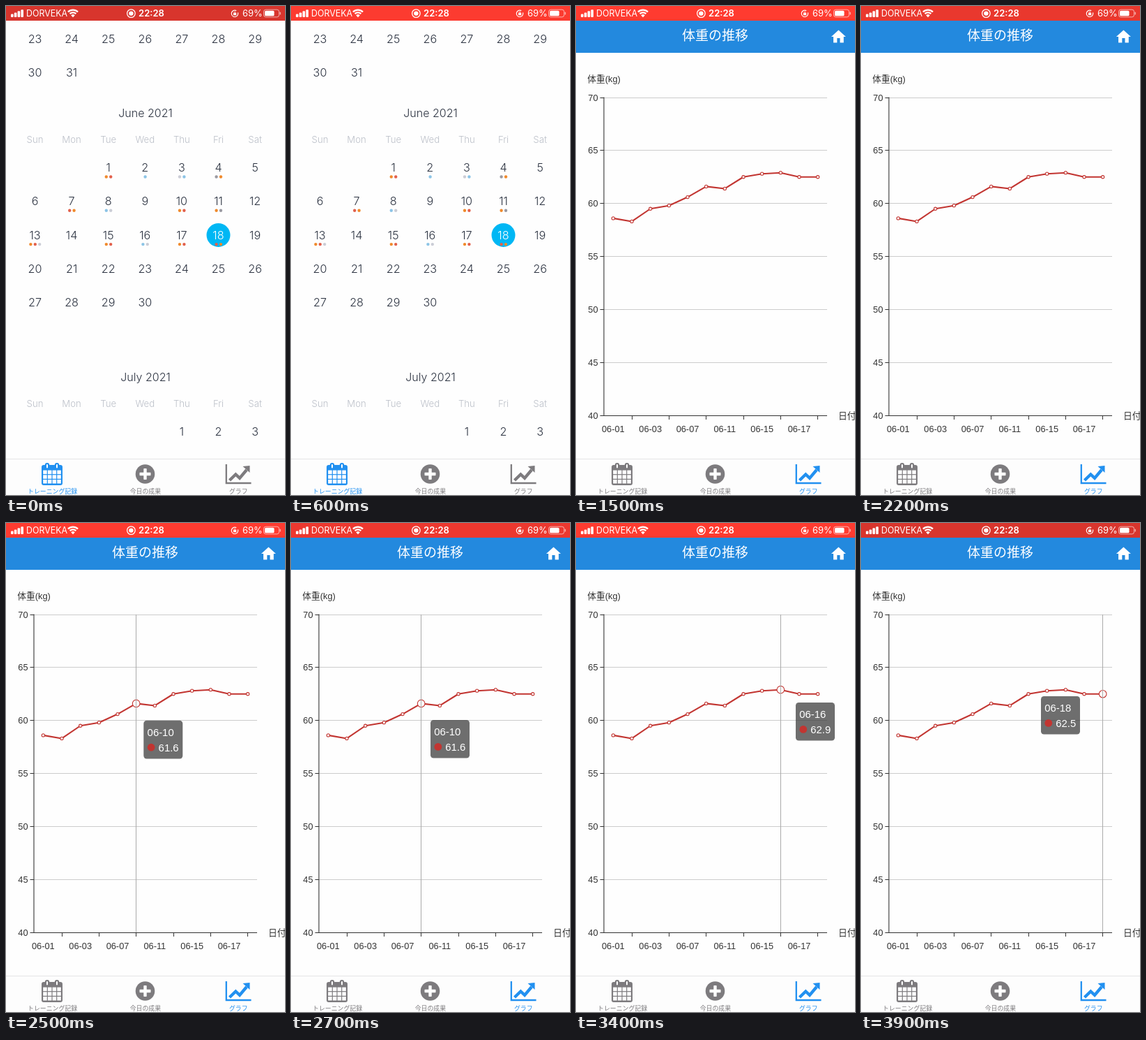
An HTML page with a canvas that plays this animation: 400 px wide and 700 px high, repeating every 4000 ms.

```html
<!DOCTYPE html>
<html lang="ja">
<head>
<meta charset="utf-8">
<title>Weight log</title>
<style>
html, body { margin: 0; width: 100%; height: 100%; overflow: hidden; background: #fff; }
canvas { display: block; }
</style>
</head>
<body>
<canvas id="stage" width="400" height="700"></canvas>
<script>
const ctx = document.getElementById('stage').getContext('2d');
const LOOP = 4000, STEP = 100;
const UI = 'Inter, "Noto Sans CJK JP", sans-serif';
const CHART = '"Liberation Sans", "Noto Sans CJK JP", sans-serif';
const JP = '"Noto Sans CJK JP", sans-serif';
const BLUE = '#2190f0', GREY = '#7d7b7e', RED = '#c23531';

const clamp = v => Math.max(0, Math.min(1, v));
const mix = (a, b, k) => a + (b - a) * k;

// y is the middle of the capitals
function text(str, x, y, size, color, { font = UI, weight = 400, align = 'center' } = {}) {
  ctx.font = `${weight} ${size}px ${font}`;
  ctx.textAlign = align;
  ctx.fillStyle = color;
  ctx.fillText(str, x, y + size * 0.36);
}
function rect(x, y, w, h, color, r = 0) {
  ctx.fillStyle = color;
  ctx.beginPath();
  ctx.roundRect(x, y, w, h, r);
  ctx.fill();
}
function circle(x, y, r, fill, stroke, width = 1) {
  ctx.beginPath();
  ctx.arc(x, y, r, 0, Math.PI * 2);
  if (fill) { ctx.fillStyle = fill; ctx.fill(); }
  if (stroke) { ctx.strokeStyle = stroke; ctx.lineWidth = width; ctx.stroke(); }
}
function line(points, color, width = 1) {
  ctx.beginPath();
  points.forEach(p => ctx.lineTo(...p));
  ctx.strokeStyle = color;
  ctx.lineWidth = width;
  ctx.stroke();
}
function polygon(points, color) {
  ctx.beginPath();
  points.forEach(p => ctx.lineTo(...p));
  ctx.fillStyle = color;
  ctx.fill();
}

function statusBar(t) {
  const k = (1 - Math.cos((t - 25) / 975 * Math.PI * 2)) / 2;
  rect(0, 0, 400, 21, `rgb(${mix(216, 255, k)},${mix(53, 59, k)},${mix(45, 48, k)})`);
  for (let i = 0; i < 4; i++) {
    const h = 4.5 + i * 2.1;
    rect(7 + i * 4.8, 16 - h, 3.6, h, '#fff', 1);
  }
  text('DORVEKA', 29, 10.7, 12.4, '#fff', { align: 'left' });

  const top = -Math.PI / 2;
  [10, 6.2].forEach(r => {
    ctx.beginPath();
    ctx.arc(96, 15.6, r, top - 0.78, top + 0.78);
    ctx.strokeStyle = '#fff';
    ctx.lineWidth = 2.4;
    ctx.stroke();
  });
  ctx.beginPath();
  ctx.moveTo(96, 16.2);
  ctx.arc(96, 16.2, 4, top - 0.78, top + 0.78);
  ctx.fillStyle = '#fff';
  ctx.fill();

  circle(179.4, 10.6, 5.8, null, '#fff', 1.3);
  circle(179.4, 10.6, 3.2, '#fff');
  text('22:28', 208.5, 10.7, 13, '#fff', { weight: 600 });

  ctx.beginPath();
  ctx.arc(328, 10.8, 4.7, -0.3, 5.2);
  ctx.strokeStyle = '#fff';
  ctx.lineWidth = 1.2;
  ctx.stroke();
  rect(326, 10, 4.2, 3.2, '#fff', 0.5);
  circle(328.1, 9.8, 1.3, null, '#fff', 0.8);

  text('69%', 339, 10.7, 13, '#fff', { align: 'left' });
  ctx.beginPath();
  ctx.roundRect(369.5, 5.2, 22, 10.6, 3);
  ctx.strokeStyle = 'rgba(255,255,255,.6)';
  ctx.lineWidth = 1;
  ctx.stroke();
  rect(371, 6.7, 13.5, 7.6, '#fff', 1.6);
  rect(392.6, 8.6, 1.4, 4, 'rgba(255,255,255,.6)', 0.7);
}

function tabBar(active) {
  const tint = i => i === active ? BLUE : GREY;
  rect(0, 648, 400, 52, '#fdfdfd');
  rect(0, 648, 400, 1, '#e4e4e6');

  rect(51, 657, 30, 29, tint(0), 3);
  for (let i = 0; i < 12; i++) {
    rect(53.2 + i % 4 * 6.7, 664.6 + Math.floor(i / 4) * 6.7, 5.5, 5.5, '#fff');
  }
  [59, 73].forEach(x => {
    rect(x - 3.2, 654, 6.4, 9, tint(0), 3);
    rect(x - 1, 656, 2, 5.6, '#fff', 1);
  });

  circle(199.5, 670, 13.8, tint(1));
  rect(191.5, 667.8, 16, 4.4, '#fff', 0.8);
  rect(197.3, 662, 4.4, 16, '#fff', 0.8);

  line([[315.8, 656], [315.8, 683], [351.5, 683]], tint(2), 2.3);
  line([[320.5, 679], [329.3, 670.5], [335, 675.8], [345, 664]], tint(2), 4.4);
  polygon([[339.5, 659], [349.5, 658], [349.5, 668]], tint(2));

  ['トレーニング記録', '今日の成果', 'グラフ'].forEach((label, i) =>
    text(label, 66.6 + i * 133.3, 694.7, 8.9, tint(i), { font: JP }));
}

const DOTS = { o: '#f08a2c', r: '#e2604c', b: '#8cc4e6', l: '#cbcdd6', g: '#9a9aa2' };
const MARKS = { 1: 'or', 2: 'b', 3: 'lb', 4: 'go', 7: 'ro', 8: 'bl', 10: 'or', 11: 'og',
  13: 'orl', 15: 'or', 16: 'bl', 17: 'or', 18: 'ro' };
const columnX = i => 41.5 + i * 52.6;

function days(first, last, column, y, marks = {}) {
  for (let d = first; d <= last; d++) {
    const cell = column + d - first;
    const x = columnX(cell % 7), cy = y + Math.floor(cell / 7) * 48.3;
    const today = marks === MARKS && d === 18;
    if (today) circle(x, cy, 17, '#00b7f4');
    text(d, x, cy, 16.2, today ? '#fff' : '#2d3442', { weight: 300 });
    [...(marks[d] || '')].forEach((c, i, all) =>
      circle(x + 0.3 + (i - (all.length - 1) / 2) * 6.4, cy + 13.2, 2.2, DOTS[c]));
  }
}
function monthHead(name, y) {
  text(name, 200, y, 16, '#2d3442', { weight: 300 });
  ['Sun', 'Mon', 'Tue', 'Wed', 'Thu', 'Fri', 'Sat'].forEach((d, i) =>
    text(d, columnX(i), y + 38.3, 13.2, '#bcc0c9', { weight: 300 }));
}
function calendar() {
  days(23, 31, 0, 46.7);
  monthHead('June 2021', 153.3);
  days(1, 30, 2, 231.3, MARKS);
  monthHead('July 2021', 531.3);
  days(1, 3, 4, 609.3);
}

const DATES = [1, 2, 3, 4, 7, 10, 11, 13, 15, 16, 17, 18].map(d => '06-' + String(d).padStart(2, '0'));
const WEIGHTS = [58.6, 58.3, 59.5, 59.8, 60.6, 61.6, 61.4, 62.5, 62.8, 62.9, 62.5, 62.5];
const BAND = 320 / 12;
const yOf = kg => 586 - (kg - 40) * 455 / 30;
const POINTS = WEIGHTS.map((kg, i) => [40 + BAND * (i + 0.5), yOf(kg)]);
const crisp = v => Math.floor(v) + 0.5;

function header() {
  rect(0, 21, 400, 46, '#2389de');
  text('体重の推移', 199.5, 42, 19, '#fff', { font: JP, weight: 300 });
  ctx.save();
  ctx.translate(363.8, 31.4);
  ctx.scale(1.05, 1.05);
  ctx.fillStyle = '#fff';
  ctx.fill(new Path2D('M10 20v-6h4v6h5v-8h3L12 3 2 12h3v8z'));
  ctx.restore();
}

function axes() {
  const ink = '#333', size = 12.8;
  for (let kg = 40; kg <= 70; kg += 5) {
    const y = crisp(yOf(kg));
    if (kg > 40) line([[40, y], [360, y]], '#ccc');
    line([[34.5, y], [40, y]], ink);
    text(kg, 31.6, y, size, ink, { font: CHART, align: 'right' });
  }
  line([[40, 130.5], [40, 587]], ink, 1.1);
  line([[40, 586.5], [360, 586.5]], ink, 1.1);
  POINTS.forEach(([x], i) => {
    if (i % 2) line([[crisp(x), 586], [crisp(x), 592]], ink);
    else text(DATES[i], x, 605.7, size, ink, { font: CHART });
  });
  text('体重(kg)', 40, 104, size, ink, { font: CHART });
  text('日付', 376, 586, size, ink, { font: CHART, align: 'left' });
}

const DRAG = [[2500, 176, 261.5], [2700, 178.7, 260.7], [3400, 293.7, 235.7], [3900, 335.3, 226.7]];
function finger(t) {
  const i = t < 2700 ? 0 : t < 3400 ? 1 : 2;
  const [a, b] = [DRAG[i], DRAG[i + 1]];
  let k = clamp((t - a[0]) / (b[0] - a[0]));
  if (i === 2) k = 1 - (1 - k) ** 2;
  return [mix(a[1], b[1], k), mix(a[2], b[2], k)];
}

function tooltip(t, index) {
  const [fx, fy] = finger(t);
  const flip = 1 - (1 - clamp((t - 3630) / 200)) ** 3;
  const x = fx + mix(21.3, -77.3, flip), y = fy + 21.3;
  const style = { font: CHART, align: 'left' };
  rect(x, y, 56, 54.6, 'rgba(50,50,50,.7)', 4.3);
  text(DATES[index], x + 5.3, y + 16.4, 14.9, '#fff', style);
  circle(x + 10.8, y + 38.4, 5.4, RED);
  text(WEIGHTS[index].toFixed(1), x + 21.3, y + 38.4, 14.9, '#fff', style);
}

function chart(t) {
  axes();
  const reveal = clamp((t - 962) / 500);
  ctx.save();
  ctx.beginPath();
  ctx.rect(40, 100, reveal < 1 ? 320 * reveal : 330, 500);
  ctx.clip();
  ctx.lineJoin = 'bevel';
  line(POINTS, RED, 2.1);
  ctx.restore();
  ctx.lineJoin = 'miter';

  const touching = t >= DRAG[0][0];
  const index = touching ? Math.min(11, Math.floor((finger(t)[0] - 40) / BAND)) : -1;
  POINTS.forEach(([x, y], i) => {
    if (i === index) circle(x, y, 5.3, '#fff', RED, 1.1);
    else if (reveal < 1) circle(x, y, 2.13 * reveal + 0.4 * (1 - reveal), reveal < 0.2 ? '#444' : '#fff', reveal < 0.2 ? null : RED, reveal);
    else circle(x, y, 2.13, '#fff', RED, 1.07);
  });
  if (touching) {
    const x = crisp(POINTS[index][0]);
    line([[x, 131], [x, 586]], '#aaa');
    tooltip(t, index);
  }
}

function draw(t) {
  const onChart = t >= 900;
  rect(0, 0, 400, 700, '#fefefe');
  if (onChart) {
    header();
    if (t >= 950) chart(t);
  } else {
    calendar();
  }
  tabBar(onChart ? 2 : 0);
  statusBar(t);
}

const start = performance.now();
function tick() {
  const t = (performance.now() - start) % LOOP;
  draw(Math.floor(t / STEP) * STEP);
  requestAnimationFrame(tick);
}
tick();
</script>
</body>
</html>
```
